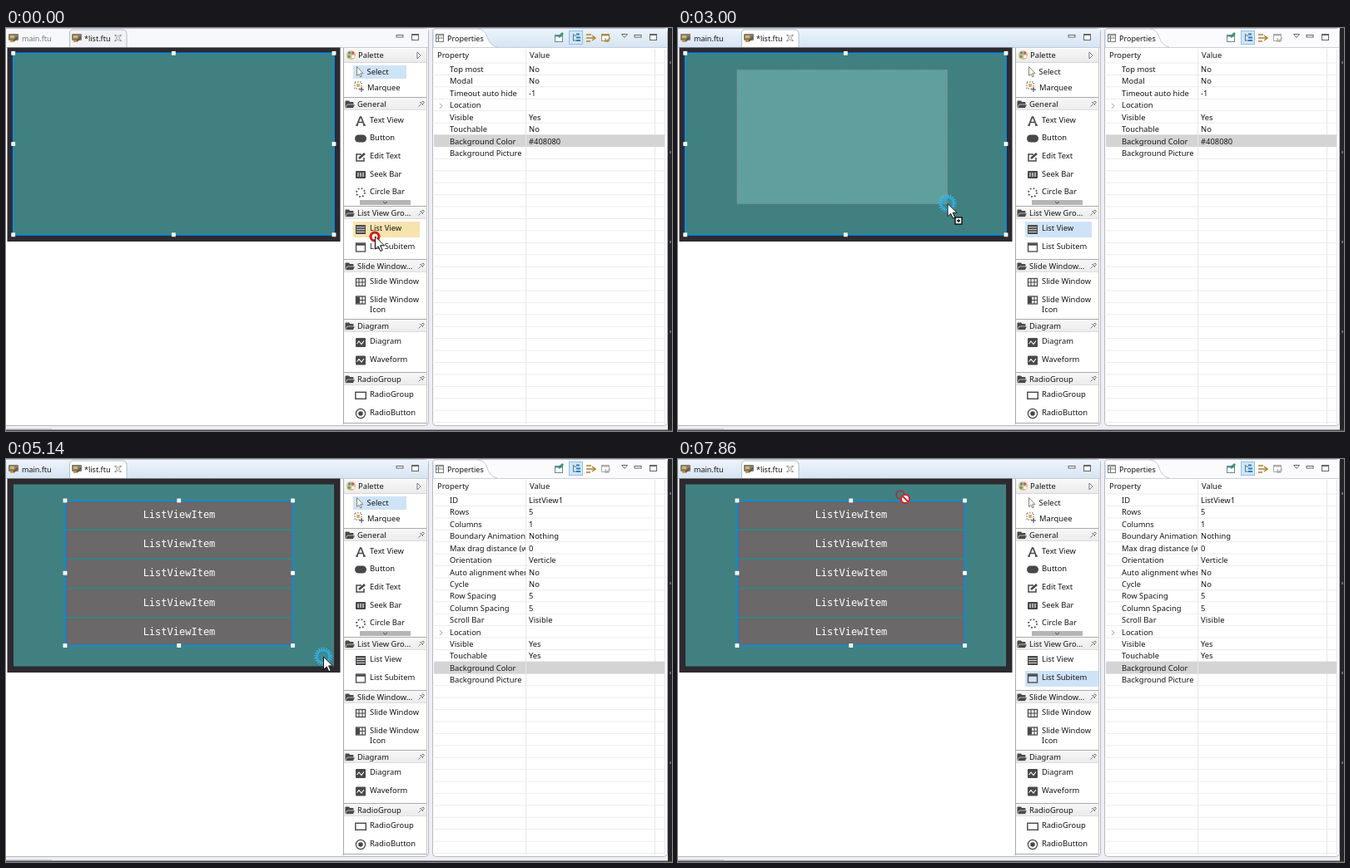
Write an HTML page that moves like this. It is 800 px wide and 485 px high and loops after 8000 ms.

```html
<!DOCTYPE html>
<html lang="en">
<head>
<meta charset="utf-8">
<title>List view editor</title>
<style>
html, body { margin: 0; width: 100%; height: 100%; overflow: hidden; background: #fff; }
svg { display: block; width: 100%; height: 100%; }
text { font: 9.4px "Noto Sans", "Open Sans", sans-serif; fill: #151515; white-space: pre; }
.tab { font-size: 9px; }
.item { font: 12px "DejaVu Sans Mono", monospace; fill: #fff; text-anchor: middle; }
</style>
</head>
<body>
<svg id="stage" viewBox="0 0 800 485"></svg>
<script>
const LOOP = 8000, STEPS = 56, ROW = 14.42, INK = '#484848';

const rect = (x, y, w, h, fill, more = '') => `<rect x="${x}" y="${y}" width="${w}" height="${h}" fill="${fill}" ${more}/>`;
const box = (x, y, w, h, stroke, sw = 1, fill = 'none', more = '') => rect(x, y, w, h, fill, `stroke="${stroke}" stroke-width="${sw}" ${more}`);
const path = (d, stroke, sw = 1, fill = 'none', more = '') => `<path d="${d}" stroke="${stroke}" stroke-width="${sw}" fill="${fill}" ${more}/>`;
const circle = (x, y, r, fill, more = '') => `<circle cx="${x}" cy="${y}" r="${r}" fill="${fill}" ${more}/>`;
const text = (x, y, s, more = '') => `<text x="${x}" y="${y}" ${more}>${s}</text>`;
const group = (id, body) => `<g id="${id}">${body}</g>`;
const at = (x, y, body) => `<g transform="translate(${x} ${y})">${body}</g>`;
const range = n => [...Array(n).keys()];

// Icons, drawn around their own centre
const icons = {
  text: path('M-4.5 5L-.5-5H.5L4.5 5M-2.7 1.5H2.7M-6 5h3M3 5h3', INK, 1.7),
  button: rect(-7, -4.5, 14, 9, INK, 'rx="4.5"'),
  edit: path('M1-3H-5V5H4V1', INK, 1.5) + path('M-2 2L5-4', INK, 2.6),
  seek: rect(-6, -4.5, 12, 9, INK, 'rx="1"') + path('M-3-2.5v5M0-2.5v5M3-2.5v5', '#fff', 1.1),
  ring: circle(0, 0, 5, 'none', `stroke="${INK}" stroke-width="1.8" stroke-dasharray="1.7 2.23"`),
  list: rect(-6, -5, 12, 11, INK) + path('M-5-2.2H5M-5 .6H5M-5 3.4H5', '#ddd', 1),
  sub: box(-5.5, -4.5, 11, 10, INK, 1.3) + path('M-5.5-3H5.5', INK, 2.4),
  slide: box(-5.5, -4.5, 11, 9, INK, 1.3) + path('M-2-4.5v9M2-4.5v9M-5.5 0h11', INK, 1.1),
  slideIcon: box(-5.5, -4.5, 11, 9, INK, 1.3) + rect(-5, -4, 4, 8, INK) + path('M2-4.5v9M-5.5 0h11', INK, 1.1),
  wave: rect(-6, -5, 12, 11, INK, 'rx="1"') + path('M-4.5 2L-2-1L1 2.5L4-1.5', '#fff', 1.1),
  radioBox: box(-6.2, -3.7, 12.5, 8, INK, 1.4),
  radio: circle(0, 0, 5.6, 'none', `stroke="${INK}" stroke-width="1.3"`) + circle(0, 0, 2.8, INK),
  folder: path('M-5 4V-4H-1L0-2.5H4V0', INK, 1, INK) + path('M-5.5 4.5L-3 0H6.5L4 4.5Z', '#fff', .6, INK),
  pin: path('M-3.5 3.5L-1 1M-2-2L2 2M-.5-1L2-3L3.5-1.5L1 .8', '#777', 1),
  file: rect(-6, -5, 12, 8, '#857c6e', 'rx="1"') + rect(-4, -3, 5, 3, '#d8b65a') + path('M0 4L5-1', '#665440', 2) + rect(-4, 3, 4, 2, '#d89a3a'),
  arrow: path('M-3.5-6V5L-1 2.8L.8 6.5L2.4 5.7L.7 2.2H4Z', '#777', .9, '#fffbe8'),
  marquee: box(-5, -5, 8, 8, '#555', 1, 'none', 'stroke-dasharray="1.5 1.5"') + rect(-3, -3, 4, 4, '#e0b35a') + path('M3 1v6M0 4h6', '#445', 1),
};
const icon = (name, x, y) => at(x, y, icons[name]);

const sections = [
  ['General', 84, [['text', 'Text View', 111], ['button', 'Button', 132], ['edit', 'Edit Text', 154], ['seek', 'Seek Bar', 175.5], ['ring', 'Circle Bar', 197]]],
  ['List View Gro...', 215, [['list', 'List View', 241], ['sub', 'List Subitem', 262.5]]],
  ['Slide Window...', 279, [['slide', 'Slide Window', 305], ['slideIcon', 'Slide Window', 326.5]]],
  ['Diagram', 351, [['wave', 'Diagram', 377], ['wave', 'Waveform', 398.5]]],
  ['RadioGroup', 415, [['radioBox', 'RadioGroup', 441], ['radio', 'RadioButton', 463]]],
];

const screenProps = ['Top most|No', 'Modal|No', 'Timeout auto hide|-1', 'Location|', 'Visible|Yes', 'Touchable|No', 'Background Color|#408080', 'Background Picture|'];
const listProps = ['ID|ListView1', 'Rows|5', 'Columns|1', 'Boundary Animation|Nothing', 'Max drag distance (when|0', 'Orientation|Verticle', 'Auto alignment when|No',
  'Cycle|No', 'Row Spacing|5', 'Column Spacing|5', 'Scroll Bar|Visible', 'Location|', 'Visible|Yes', 'Touchable|Yes', 'Background Color|', 'Background Picture|'];

function props(rows) {
  return rows.map((row, i) => {
    const [name, value] = row.split('|'), y = 42 + i * ROW;
    return (name == 'Background Color' ? rect(514, y, 277, ROW, '#d4d4d4') + rect(624, y, 1, ROW, '#e4e4e4') : '')
      + (name == 'Location' ? path(`M521 ${y + 5.5}l3 3l-3 3`, '#999') : '')
      + text(533, y + 11, name, 'clip-path="url(#names)"') + text(628, y + 11, value);
  }).join('');
}

const minMax = (x, gap) => box(x - 4, 8.5, 8, 2.5, '#666', 1, '#fff') + box(x + gap - 4, 7.5, 8, 7, '#666', 1, '#fff') + path(`M${x + gap - 4} 8.5h8`, '#666');

function frameUI() {
  return rect(0, 0, 800, 485, '#eeeff4')
    + rect(-5, .5, 512.5, 478, '#fff', 'stroke="#b4bac6" rx="4"')
    + rect(0, 1, 507, 22, '#f7f8fb', 'id="editorBar"') + path('M0 23.5H507', '#c3cad6')
    + path('M76.5 23V6q0-4 5-4H139q6 0 6 5V23', '#b4bac6', 1, '#fff', 'id="tab"')
    + icon('file', 9, 12) + text(19, 15.5, 'main.ftu', 'class="tab" id="mainTab"')
    + icon('file', 85, 12) + text(94, 15.5, '*list.ftu', 'class="tab"')
    + path('M130.5 8.5l3 3.5l-3 3.5h2l2-2l2 2h2l-3-3.5l3-3.5h-2l-2 2l-2-2Z', '#777', .8, '#fff') + minMax(473, 18.5)
    + rect(512.5, .5, 282, 478, '#fff', 'stroke="#b4bac6" rx="4"')
    + rect(513, 1, 281, 22, '#fbfbfd', 'id="propBar"')
    + path('M513 23.5H794', '#c9cfda') + path('M513 23V3q0-2 3-2H566q9 0 12 10t12 12', '#c3cad6', 1, '#fff')
    + box(516.5, 7.5, 9, 9, '#777', 1, '#fff') + path('M516.5 9h9M519.5 9v7M517 12h8', '#777', 1) + text(530, 15.5, 'Properties', 'class="tab"')
    + box(659.5, 8.5, 9, 8, '#6c8792', 1, '#fff') + path('M659 9.5h10', '#5c8fae', 2) + path('M664 11l5-5', '#3a9565', 2.6)
    + rect(676.5, 3.5, 16, 16, '#cfe6fa', 'stroke="#8fbfe8"') + path('M681.5 7v8.5M681 9h4M681 15h4', '#57788e') + path('M685 7.5h4M685 11.5h5M685 15h5', '#367fa6', 2)
    + path('M697 8h6M697 12h10M697 16h5M704 9l4 3l-4 3', '#b07f2f', 1.4)
    + group('reset', box(715.5, 7.5, 9, 8, 'currentColor', 1, '#fff') + path('M715 8.5h10', 'currentColor', 2) + path('M720 16l6-4M720 12v4h4', 'currentColor', 1.3))
    + path('M739.5 7.5h7l-3.5 4Z', '#666', 1, '#fff') + minMax(759, 18.5)
    + rect(795, 0, 5, 485, '#252528') + range(4).map(i => rect(797, 40 + i * 108, 2, 3, '#666')).join('')
    + rect(0, 483.5, 800, 1.5, '#44474d') + rect(0, 482, 55, 1, '#c5cad2');
}

function table() {
  return text(518, 36, 'Property') + text(629, 36, 'Value')
    + range(31).map(i => rect(514, 41.5 + i * ROW, 277, 1, '#ececec')).join('')
    + [624, 779, 791].map(x => rect(x, 25, 1, 452, '#e6e6e6')).join('')
    + group('screenProps', props(screenProps)) + group('listProps', props(listProps));
}

function palette() {
  const head = (y, h) => rect(406, y, 99, h, 'url(#head)');
  return rect(405, 24, 1, 453, '#aaa') + rect(505, 24, 1, 453, '#c8c8c8')
    + head(25, 16) + path('M406 41.5h99', '#d5d5d5')
    + circle(414.5, 32.5, 5.5, '#d9c08b') + circle(412.5, 30, 1.7, '#4d8dc6') + circle(416.5, 30, 1.7, '#d05b49') + circle(412, 34.5, 1.7, '#5ca35b') + circle(417, 34.5, 1.7, '#fff')
    + text(423, 36, 'Palette') + path('M494 29v8l4-4Z', '#777', 1, '#fff')
    + rect(417, 45, 64, 16, '#cfe3f7', 'id="selectBg"') + rect(417, 233, 80, 19, '#cfe3f7', 'id="listBg"') + rect(417, 255, 88, 19, '#cfe3f7', 'id="subBg"')
    + icon('arrow', 425, 52.5) + text(433.5, 56, 'Select') + icon('marquee', 424, 70) + text(434, 74.5, 'Marquee')
    + sections.map(([name, y, items]) => head(y, 15) + path(`M406 ${y - .5}h99`, '#aaa') + path(`M406 ${y + 14.5}h99`, '#dedede')
      + icon('folder', 413, y + 8) + text(422, y + 11, name) + icon('pin', 499, y + 7)
      + items.map(([ic, s, cy]) => icon(ic, 426, cy + 1) + text(437, cy + 3.3, s)).join('')).join('')
    + text(437, 341.5, 'Icon')
    + rect(425, 207, 61, 6, '#b5b5b5') + path('M453 209l2.5 2l2.5-2', '#444') + path('M405 475.5h100', '#aaa');
}

function selection(id, x, y, w, h) {
  const dots = [0, .5, 1].flatMap(u => [0, .5, 1].map(v => u == .5 && v == .5 ? '' : rect(x + u * w - 2.4, y + v * h - 2.4, 4.8, 4.8, '#fff')));
  return group(id, box(x, y, w, h, '#0a8be0', 1.7) + dots.join(''));
}

function screen() {
  return rect(1.5, 23.5, 400, 233.5, '#2c2a2f') + rect(9, 30.5, 385, 219, '#408080')
    + group('list', range(5).map(i => rect(71, 51 + i * 35.2, 273, 31, '#6a6869', 'class="cell"')
      + text(208, 71 + i * 35.2, 'ListViewItem', 'class="item"')).join(''))
    + rect(71, 50.5, 0, 0, '#5f9f9e', 'id="band" stroke="#858e8e" stroke-dasharray="2 1"')
    + selection('screenSel', 8.7, 30.3, 385.3, 218.5) + selection('listSel', 71, 50, 273.5, 174.5);
}

function pointer() {
  const halo = circle(0, -.5, 7.5, 'none', 'stroke="#27aeea" stroke-width="2.8" stroke-opacity=".9"')
    + circle(0, -.5, 9.5, 'none', 'stroke="#4fc0ee" stroke-width="3" stroke-dasharray="1.2 1.8" stroke-opacity=".75"')
    + circle(0, -.5, 5.5, '#3aa0b8', 'fill-opacity=".35"');
  return group('pointer', group('halo', halo)
    + group('press', circle(0, 0, 5, '#fff', 'fill-opacity=".5" stroke="#c81818" stroke-width="3"') + circle(0, 0, 6, 'none', 'stroke="#e05248" stroke-width="1.2" stroke-dasharray="1.5 1.5"'))
    + group('arrow', path('M.5 0V15.2L4.2 11.8L6.8 17.6L9.2 16.5L6.6 10.8H11.5Z', '#111', 1, '#fff'))
    + group('plus', box(9.5, 16.5, 8, 8, '#111', 1.4, '#fff') + path('M11.5 20.5h4M13.5 18.5v4', '#111', 1.3))
    + group('forbid', circle(0, 0, 4.8, 'none', 'stroke="#a82c3a" stroke-width="1.6"')
      + circle(6, 5, 5, '#fff', 'stroke="#d3222b" stroke-width="2"') + path('M2.5 1.5l7 7', '#d3222b', 2)));
}

const gradient = (id, a, b) => `<linearGradient id="${id}" x2="0" y2="1"><stop stop-color="${a}"/><stop offset="1" stop-color="${b}"/></linearGradient>`;
const $ = id => document.getElementById(id);
$('stage').innerHTML = '<defs>' + gradient('active', '#edf4fb', '#d6e4f3') + gradient('head', '#f7f7f7', '#ebebeb')
  + '<clipPath id="names"><rect x="514" y="24" width="110" height="455"/></clipPath></defs>'
  + frameUI() + table() + screen() + palette() + pointer();

// Pointer stops: step, x, y
const stops = [[0, 443, 251], [2, 443, 251], [7, 355, 194.5], [12, 71, 50], [13, 71, 50], [16, 140, 80.5], [21, 323.5, 211.5], [24, 344, 224.5],
  [31, 344, 224.5], [33, 333, 222], [40, 455, 263], [43, 455, 263], [53, 267, 36], [55, 267, 43], [56, 267, 43]];

function locate(k) {
  const i = stops.findIndex((s, j) => j && k <= s[0]);
  const [k0, x0, y0] = stops[i - 1], [k1, x1, y1] = stops[i];
  const u = (k - k0) / (k1 - k0), e = u * u * (3 - 2 * u);
  return [x0 + (x1 - x0) * e, y0 + (y1 - y0) * e];
}

const show = (id, on) => $(id).style.display = on ? '' : 'none';
const paint = (id, fill) => $(id).setAttribute('fill', fill);
const HOT = '#f7e3ae', CHOSEN = '#cfe3f7', ACTIVE = 'url(#active)';

function draw(time) {
  const k = Math.min(STEPS - 1, Math.floor((time + 5) * STEPS / LOOP));
  const [x, y] = locate(k);
  const focused = k >= 2, made = k >= 28, picked = k >= 30, armed = k >= 43;
  const inside = x < 402, forbid = armed && inside, pressed = k < 2 || (k > 40 && k < 44);
  const overList = x > 417 && y > 233 && y < 253, overSub = x > 417 && y > 254 && y < 275;

  paint('editorBar', focused ? ACTIVE : '#f7f8fb');
  paint('propBar', focused ? '#fbfbfd' : ACTIVE);
  paint('tab', focused ? '#fff' : '#f1f2f6');
  $('mainTab').style.fill = focused ? '#151515' : '#777';
  $('reset').style.color = focused ? '#aaa' : '#a98a4c';

  show('screenProps', !made);
  show('listProps', made);
  show('list', made);
  document.querySelectorAll('.cell').forEach(c => c.setAttribute('height', picked ? 33 : 31));
  show('screenSel', !picked);
  show('listSel', picked);

  show('selectBg', !focused || (picked && !armed));
  const listTool = focused && !picked;
  show('listBg', listTool || overList);
  paint('listBg', listTool ? CHOSEN : HOT);
  show('subBg', armed || overSub);
  paint('subBg', armed ? CHOSEN : HOT);

  show('band', k >= 13 && !made);
  $('band').setAttribute('width', Math.max(0, x - 71));
  $('band').setAttribute('height', Math.max(0, y - 50.5));

  $('pointer').setAttribute('transform', `translate(${x} ${y})`);
  show('halo', !pressed && !forbid);
  show('press', pressed);
  show('arrow', !forbid);
  show('plus', inside && listTool && !made);
  show('forbid', forbid);
}

function tick() {
  draw(performance.now() % LOOP);
  requestAnimationFrame(tick);
}
tick();
</script>
</body>
</html>
```
